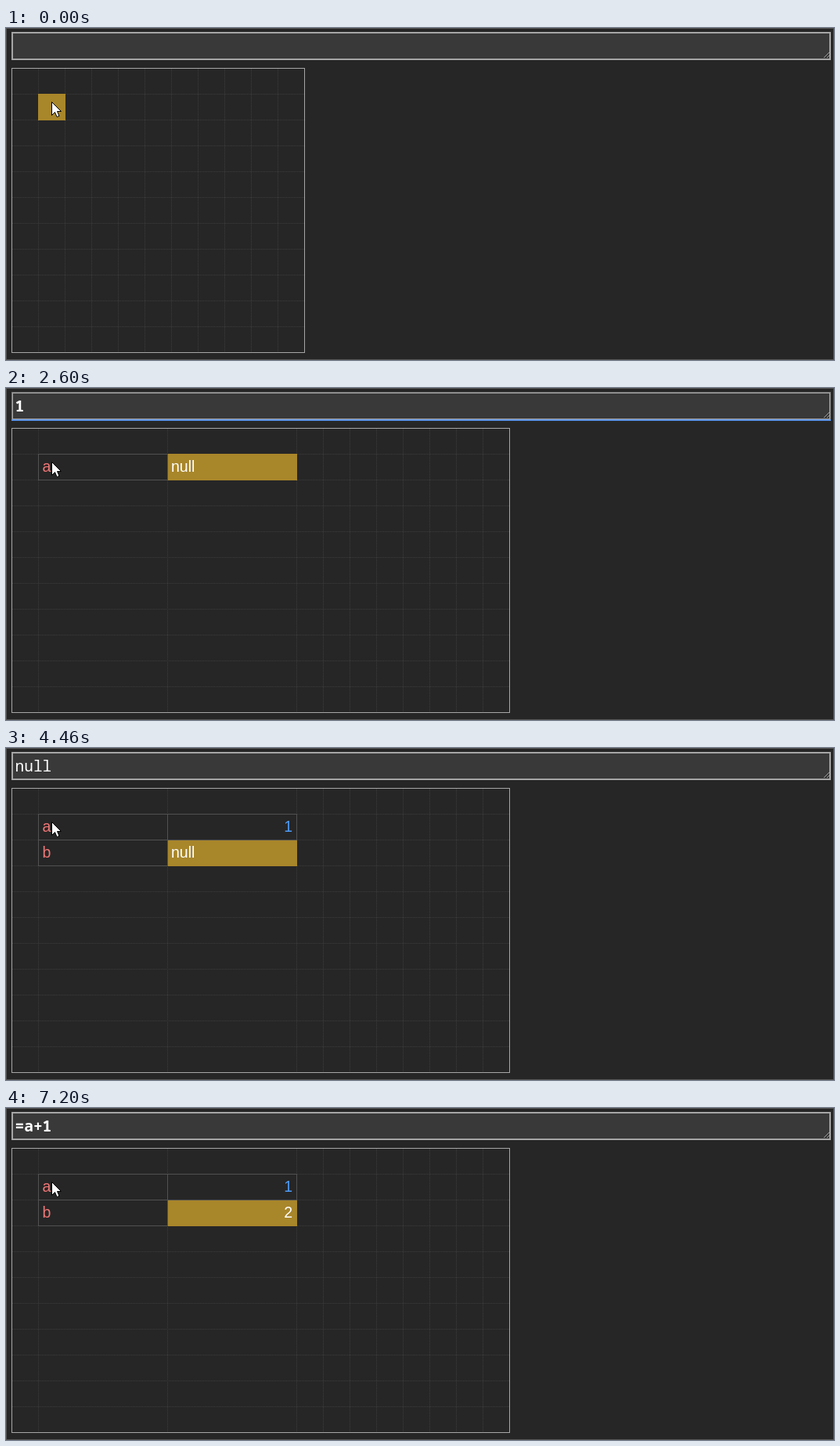
These frames come from a looping animation (1058x424 px, 8 s). An HTML page with a canvas:

```html
<!DOCTYPE html>
<html lang="en">
<head>
<meta charset="utf-8">
<title>Cell editor</title>
<style>
  html, body { margin: 0; width: 1058px; height: 424px; overflow: hidden; background: #262626; }
  canvas { display: block; }
</style>
</head>
<body>
<canvas id="stage" width="1058" height="424"></canvas>
<script>
const ctx = document.getElementById('stage').getContext('2d');
const LOOP = 8000;
const CHAR = 11.7, TEXT_X = 11.5;
const MONO = '19.5px "Noto Sans Mono", "DejaVu Sans Mono", monospace';
const SANS = '19.5px "Liberation Sans", Arial, sans-serif';
const INK = '#ffffff', GOLD = '#a8862a', KEY = '#f27777', NUM = '#4f9cf9';
const LINE = '#a6a6a6', DOT = '#3c3c3c', EDGE = '#515151';

// Columns: 0 = key, 1 = value. Each step overrides the state before it.
const steps = [
  [0, { wide: false, cells: [], sel: [0, 0], text: '', focus: false, caret: false }],
  [1080, { text: 'a', focus: true, caret: true }],
  [1650, { wide: true, cells: [['a', 'null']], sel: [1, 0], text: 'null', focus: false, caret: false }],
  [2060, { text: '1', focus: true, caret: true }],
  [2600, { caret: false }],
  [2730, { cells: [['a', '1']], sel: [1, 1], text: '', focus: false }],
  [3190, { sel: [0, 1] }],
  [3900, { text: 'b', focus: true, caret: true }],
  [4460, { cells: [['a', '1'], ['b', 'null']], sel: [1, 1], text: 'null', focus: false, caret: false }],
  [5050, { text: '=', focus: true, caret: true }],
  [5330, { text: '=a' }],
  [5610, { text: '=a+' }],
  [5890, { text: '=a+1' }],
  [6460, { cells: [['a', '1'], ['b', '2']], sel: [1, 2], text: '', focus: false, caret: false }],
  [7200, { sel: [1, 1], text: '=a+1' }]
];

function stateAt(t) {
  const state = {};
  for (const [start, change] of steps) if (start <= t) Object.assign(state, change);
  return state;
}

function fill(color, x, y, w, h) {
  ctx.fillStyle = color;
  ctx.fillRect(x, y, w, h);
}

function frame(color, x, y, w, h, size = 1) {
  ctx.strokeStyle = color;
  ctx.lineWidth = size;
  ctx.strokeRect(x + size / 2, y + size / 2, w - size, h - size);
}

function label(str, x, y, color, font, align = 'left') {
  ctx.font = font;
  ctx.textAlign = align;
  ctx.fillStyle = color;
  ctx.fillText(str, x, y);
}

function drawInput({ text, focus, caret }) {
  fill('#393939', 7, 5, 1047, 36);
  frame(LINE, 7, 5, 1047, 36, 2);
  if (focus) {
    frame('#777777', 7, 5, 1047, 36);
    fill('#5b93e6', 7, 40, 1047, 2);
  }
  ctx.strokeStyle = '#a0a0a0';
  ctx.lineWidth = 1;
  ctx.beginPath();
  for (const size of [7, 3]) {
    ctx.moveTo(1052 - size, 38);
    ctx.lineTo(1052, 38 - size);
  }
  ctx.stroke();
  label(text, TEXT_X, 30, INK, (text === 'null' ? '500 ' : 'bold ') + MONO);
  if (caret) fill(INK, Math.floor(TEXT_X + CHAR * text.length), 11, 2, 24);
}

function drawGrid({ wide, cells, sel }) {
  const step = wide ? 165 : 34;
  const right = 41 + 2 * step + (wide ? 8 : 8) * 34;
  const colX = i => 41 + Math.min(i, 2) * step + Math.max(i - 2, 0) * 34;

  ctx.strokeStyle = DOT;
  ctx.lineWidth = 1;
  ctx.setLineDash([1, 1]);
  ctx.beginPath();
  for (let i = 0; i < 10; i++) {
    const x = colX(i) + 0.5, y = 84.5 + i * 33;
    ctx.moveTo(x, 52);
    ctx.lineTo(x, 414);
    ctx.moveTo(8, y);
    ctx.lineTo(right, y);
  }
  ctx.stroke();
  ctx.setLineDash([]);
  frame(LINE, 7, 51, right - 6, 364);

  const [col, row] = sel;
  const x = colX(col), y = 84 + row * 33;
  const top = row ? y + 1 : y;
  const left = cells[row] && col ? x + 1 : x;
  cells.forEach((_, r) => {
    for (let c = 0; c < 2; c++) frame(EDGE, colX(c), 84 + r * 33, step + 1, 34);
  });
  fill(GOLD, left, top, x + step + 1 - left, y + 34 - top);

  cells.forEach(([key, value], r) => {
    const base = 107 + r * 33;
    const active = col === 1 && row === r;
    label(key, 46.5, base, KEY, SANS);
    if (value === 'null') label(value, 211, base, INK, SANS);
    else label(value, 366, base, active ? INK : NUM, SANS, 'right');
  });
}

function drawPointer() {
  ctx.save();
  ctx.translate(58.5, 94.5);
  ctx.beginPath();
  ctx.moveTo(0, 0);
  for (const [x, y] of [[0, 17], [4, 13], [6.5, 19], [9.5, 18], [7, 12], [12, 12]]) ctx.lineTo(x, y);
  ctx.closePath();
  ctx.fillStyle = INK;
  ctx.fill();
  ctx.strokeStyle = '#000000';
  ctx.lineWidth = 1;
  ctx.stroke();
  ctx.restore();
}

function draw(now) {
  const state = stateAt(now % LOOP);
  fill('#262626', 0, 0, 1058, 424);
  frame('#555555', 0, 0, 1058, 424);
  drawInput(state);
  drawGrid(state);
  drawPointer();
  requestAnimationFrame(draw);
}

draw(0);
</script>
</body>
</html>
```
